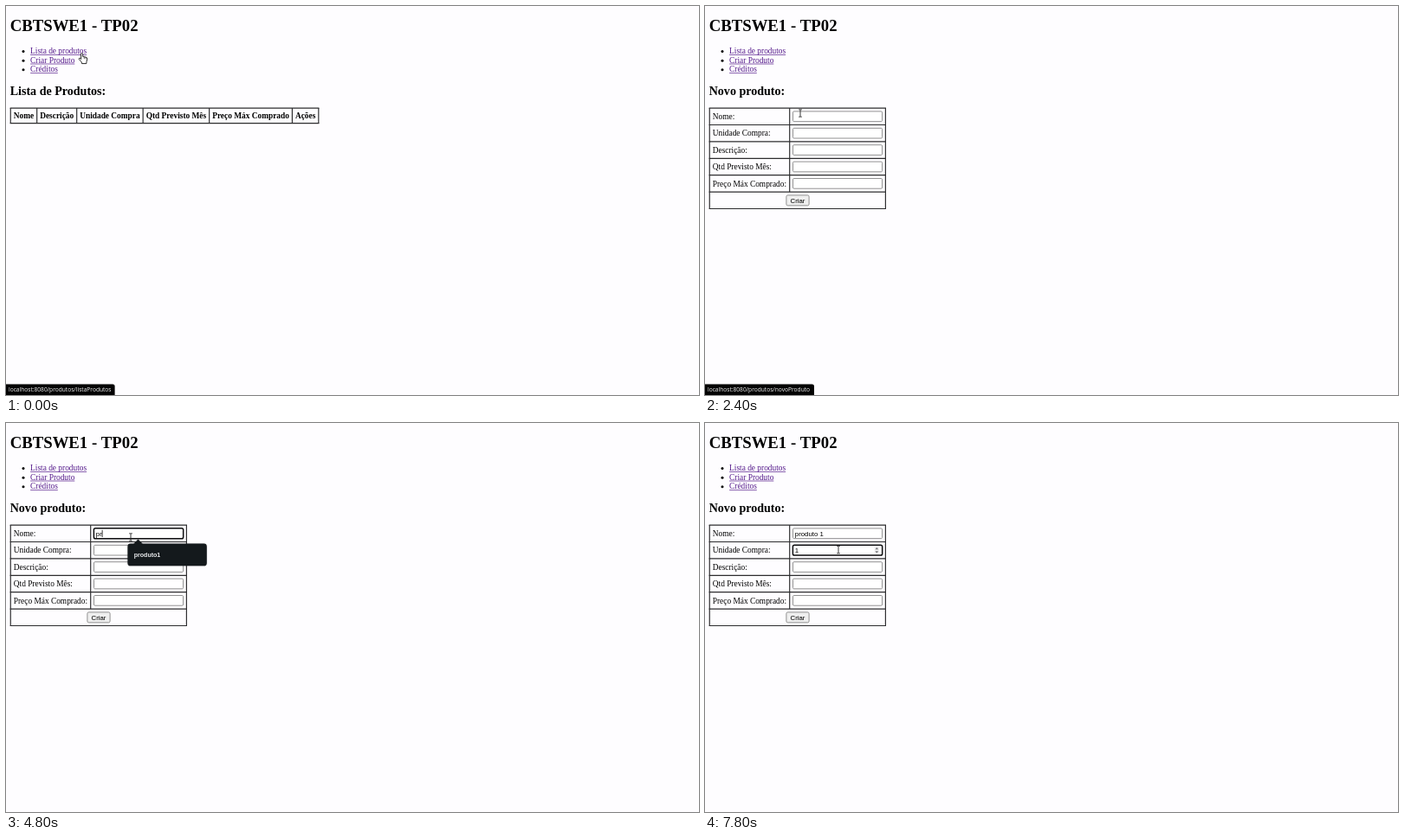
Write an HTML page with a canvas that moves like this. It is 800x450 px and loops after 8000 ms.

```html
<!DOCTYPE html>
<html lang="pt-BR">
<head>
<meta charset="utf-8">
<title>CBTSWE1 - TP02</title>
<style>
  html, body { margin: 0; width: 100%; height: 100%; overflow: hidden; background: #fefdff; }
  canvas { display: block; width: 800px; height: 450px; }
</style>
</head>
<body>
<canvas id="stage"></canvas>
<script>
const LOOP = 8000, STEP = 200;
const K = 800 / 1366; // page pixels to stage pixels
const SERIF = '"Liberation Serif", "Times New Roman", serif';
const SANS = '"Liberation Sans", Arial, sans-serif';
const UI = '"Open Sans", sans-serif';
const BODY = 16 * K, SMALL = 13.333 * K;
const INK = '#000', LINE = '#2c2c2e', GREY = '#767676', DARK = '#14191c';
const LEFT = 8 * K, EDGE = 9 * K, TOP = 118.1, ROW = 19.4, PAD = 6 * K;

const canvas = document.getElementById('stage');
const ctx = canvas.getContext('2d');
const dpr = window.devicePixelRatio || 1;
canvas.width = 800 * dpr;
canvas.height = 450 * dpr;

function text(str, x, y, size, family, { color = INK, weight = 400, align = 'left' } = {}) {
  ctx.font = `${weight} ${size}px ${family}`;
  ctx.textAlign = align;
  ctx.fillStyle = color;
  ctx.fillText(str, x, y);
  return ctx.measureText(str).width;
}

function line(x1, y1, x2, y2, color = LINE, width = 2 * K) {
  ctx.beginPath();
  ctx.moveTo(x1, y1);
  ctx.lineTo(x2, y2);
  ctx.strokeStyle = color;
  ctx.lineWidth = width;
  ctx.stroke();
}

function box(x, y, w, h, r, fill, stroke, width = K) {
  ctx.beginPath();
  ctx.roundRect(x, y, w, h, r);
  if (fill) { ctx.fillStyle = fill; ctx.fill(); }
  if (stroke) { ctx.strokeStyle = stroke; ctx.lineWidth = width; ctx.stroke(); }
}

function triangle(x, y, half, h, color) {
  ctx.beginPath();
  ctx.moveTo(x, y);
  ctx.lineTo(x + half, y + h);
  ctx.lineTo(x - half, y + h);
  ctx.fillStyle = color;
  ctx.fill();
}

// Position along [time, x, y] points
function along(points, t) {
  let a = points[0];
  for (const b of points) {
    if (t < b[0]) {
      const p = Math.max(0, (t - a[0]) / (b[0] - a[0] || 1));
      return [a[1] + (b[1] - a[1]) * p, a[2] + (b[2] - a[2]) * p];
    }
    a = b;
  }
  return [a[1], a[2]];
}

function header(title) {
  text('CBTSWE1 - TP02', LEFT, 29.3, 32 * K, SERIF, { weight: 700 });
  ['Lista de produtos', 'Criar Produto', 'Créditos'].forEach((label, i) => {
    const y = 55.3 + i * 18 * K, x = 48 * K, color = '#551a8b';
    ctx.beginPath();
    ctx.arc(20, y - 2.7, 1.5, 0, 7);
    ctx.fillStyle = INK;
    ctx.fill();
    const w = text(label, x, y, BODY, SERIF, { color });
    line(x, y + 1.2, x + w, y + 1.2, color, 0.7);
  });
  text(title, LEFT, 102.6, 24 * K, SERIF, { weight: 700 });
}

function listPage() {
  header('Lista de Produtos:');
  const bottom = TOP + 30 * K;
  let x = EDGE;
  line(x, TOP, x, bottom);
  for (const label of ['Nome', 'Descrição', 'Unidade Compra', 'Qtd Previsto Mês', 'Preço Máx Comprado', 'Ações']) {
    x += text(label, x + PAD, 130.1, BODY, SERIF, { weight: 700 }) + 2 * PAD;
    line(x, TOP, x, bottom);
  }
  line(EDGE - K, TOP, x + K, TOP);
  line(EDGE - K, bottom, x + K, bottom);
}

function field(row, value, focused, caret) {
  const x = 101.2, y = TOP + PAD + row * ROW, w = 177 * K, h = 21 * K;
  if (focused) box(x + 0.2, y + 0.2, w - 0.4, h - 0.4, 1.8, '#fff', '#0c0c0e', 1.5);
  else box(x + 0.3, y + 0.3, w - 0.6, h - 0.6, 1.2, '#fff', GREY, 0.8);
  const end = x + 2.6 + text(value, x + 2.6, y + 9, SMALL, SANS);
  if (focused && caret) line(end + 0.4, y + 2.2, end + 0.4, y + 10.4, INK, 0.8);
}

function formPage(t) {
  header('Novo produto:');
  const labels = ['Nome:', 'Unidade Compra:', 'Descrição:', 'Qtd Previsto Mês:', 'Preço Máx Comprado:'];
  const mid = 97.7, right = 208.4, bottom = TOP + 6 * ROW;
  for (let i = 0; i <= 6; i++) line(EDGE - K, TOP + i * ROW, right + K, TOP + i * ROW);
  line(EDGE, TOP, EDGE, bottom);
  line(right, TOP, right, bottom);
  line(mid, TOP, mid, TOP + 5 * ROW);

  const name = typedName(t);
  const focus = t < 4200 ? -1 : t < 6600 ? 0 : 1;
  const caret = focus === 0 || t < 7000 || (t >= 7200 && t < 7800);
  const values = [name, t >= 7200 ? '1' : '', '', '', ''];
  labels.forEach((label, i) => {
    text(label, EDGE + PAD, TOP + i * ROW + 12.8, BODY, SERIF);
    field(i, values[i], focus === i, caret);
  });
  if (t >= 6600) {
    box(195.6, 142.9, 5.4, 8.7, 0.5, '#f0f0f1');
    triangle(198.3, 144.1, 1.9, 2.1, '#707074');
    triangle(198.3, 150.4, 1.9, -2.1, '#707074');
  }
  box(93.9, 218.9, 26.2, 11.9, 1.6, '#efefef', GREY, 0.8);
  text('Criar', 107, 227.5, SMALL, SANS, { align: 'center' });

  if (t >= 4200 && t < 4600) popup(['produto1', 'teste', 'caneta', 'caderno'], 1);
  else if (t >= 4600 && t < 5800) popup(['produto1'], 1);
  else if (t >= 5800 && t < 6000) popup(['produto1'], 0.085, 1.8);
}

function typedName(t) {
  if (t < 4600) return '';
  if (t >= 6000) return 'produto 1';
  const n = (t - 4600) / STEP + 1;
  return 'produto '.slice(0, n > 4 ? n + 1 : n);
}

function popup(items, alpha, inset = 0) {
  const h = 25.7 + (items.length - 1) * 21.7;
  ctx.save();
  ctx.globalAlpha = alpha;
  if (!inset) {
    ctx.shadowColor = 'rgba(0,0,0,.3)';
    ctx.shadowBlur = 1.5 * dpr;
    triangle(152.5, 134.6, 5.4, 5.4, DARK);
  }
  box(140.4 + inset, 139.6 + inset / 3, 91.4 - 2 * inset, h - inset / 2, 3.4, DARK);
  ctx.shadowColor = 'transparent';
  items.forEach((item, i) =>
    text(item, 147.8, 155.1 + i * 21.7, 12 * K, SANS, { weight: 700, color: '#eceef0' }));
  ctx.restore();
}

function statusBar(path) {
  box(-4, 437.6, path.startsWith('lista') ? 129.6 : 130, 16, 2.5, '#030303');
  text('localhost:8080/produtos/' + path, 3, 446.3, 6.63, UI, { color: '#f4f4f4' });
}

function hand(x, y) {
  ctx.save();
  ctx.translate(x, y);
  ctx.beginPath();
  ctx.moveTo(0, 1);
  ctx.quadraticCurveTo(1, -0.7, 2, 1);
  ctx.lineTo(2.1, 4.3);
  ctx.lineTo(5.4, 4.9);
  ctx.quadraticCurveTo(7.2, 5.2, 7.2, 7);
  ctx.lineTo(6.4, 10.2);
  ctx.lineTo(6.2, 12.4);
  ctx.lineTo(0.9, 12.4);
  ctx.lineTo(0.6, 10.7);
  ctx.lineTo(-2.4, 7.2);
  ctx.quadraticCurveTo(-2.4, 5.6, -0.9, 6.4);
  ctx.lineTo(0, 7.3);
  ctx.closePath();
  ctx.fillStyle = '#fff';
  ctx.fill();
  ctx.lineJoin = 'round';
  ctx.strokeStyle = '#111';
  ctx.lineWidth = 0.9;
  ctx.stroke();
  line(3.7, 4.9, 3.7, 7, '#111', 0.6);
  line(5.4, 5.2, 5.4, 7.2, '#111', 0.6);
  ctx.restore();
}

function beam(x, y) {
  line(x, y - 4, x, y + 4, '#222', 0.9);
  for (const dy of [-4.2, 4.2]) line(x - 1.9, y + dy, x + 1.9, y + dy, '#222', 0.8);
}

const handPath = [[400, 86.6, 54.2], [1400, 71.6, 64]];
const beamPath = [[2000, 72, 66], [2400, 110, 124], [2800, 144, 132], [6000, 144, 132], [6600, 154, 146.6]];

function draw(t) {
  ctx.setTransform(dpr, 0, 0, dpr, 0, 0);
  ctx.fillStyle = '#fefdff';
  ctx.fillRect(0, 0, 800, 450);
  if (t < 2000) listPage();
  else formPage(t);
  if (t < 2800) statusBar(t < 1000 ? 'listaProdutos' : 'novoProduto');
  if (t < 2200) hand(...along(handPath, t));
  else beam(...along(beamPath, t));
}

const start = performance.now();
function tick() {
  const t = (performance.now() - start) % LOOP;
  draw(Math.floor(t / STEP) * STEP);
  requestAnimationFrame(tick);
}
tick();
</script>
</body>
</html>
```
